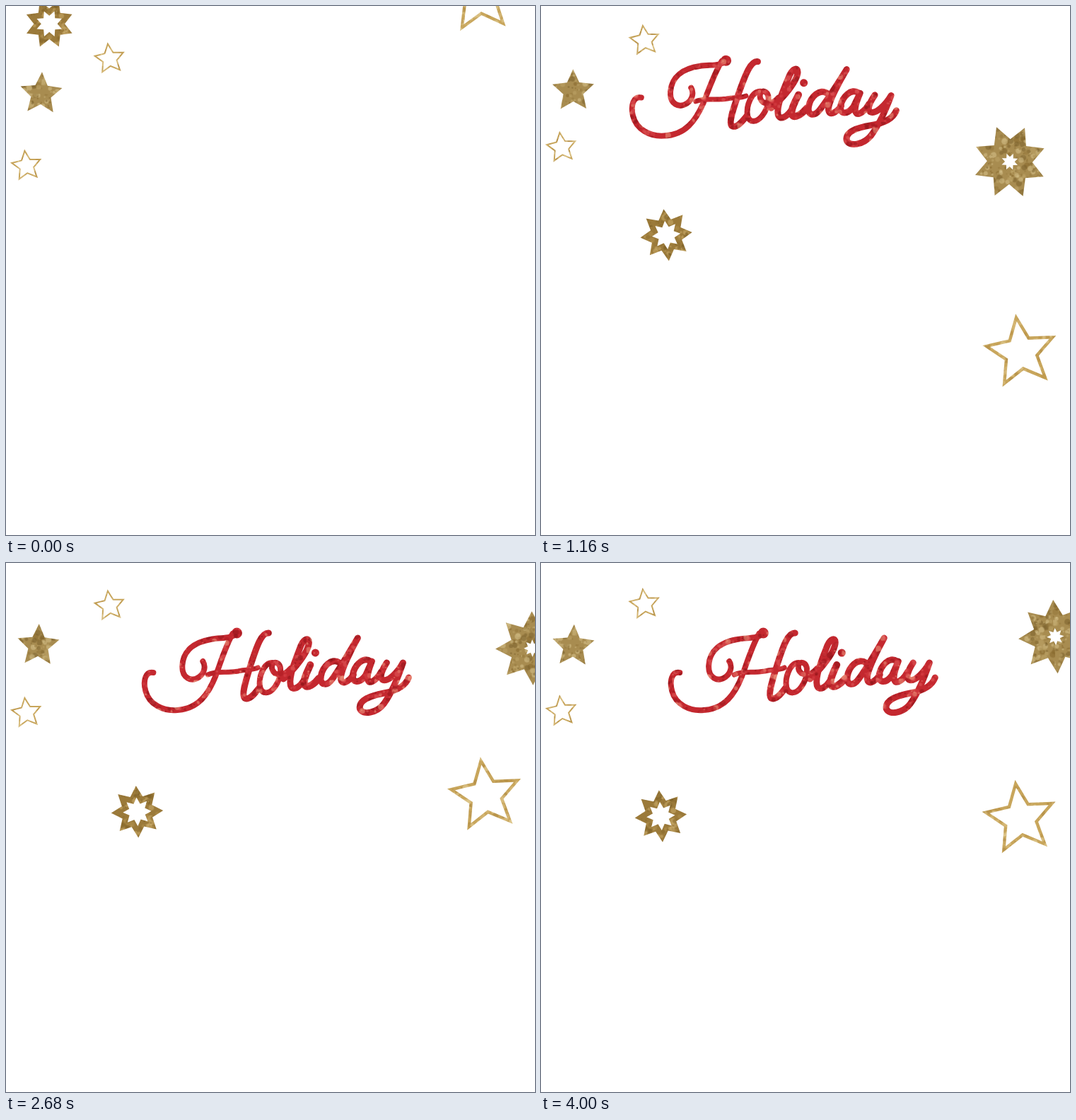
These frames come from a looping animation (748 by 748 pixels, 4040 ms). An HTML page:

```html
<!DOCTYPE html>
<html lang="en">
<head>
<meta charset="utf-8">
<title>Holiday</title>
<style>
  html, body { margin: 0; width: 100%; height: 100%; overflow: hidden; background: #fff; }
  svg { display: block; width: 100vw; height: 100vh; }
</style>
</head>
<body>
<svg id="stage" viewBox="0 0 748 748">
  <defs id="defs"></defs>
  <g id="word" role="img" aria-label="Holiday" fill="none" stroke="url(#red)" stroke-width="9"
     stroke-linecap="round" stroke-linejoin="round">
    <!-- H -->
    <path stroke-width="8" d="M198 155C187 153 183 166 187 181C192 200 212 210 232 208C262 206 276 185 286 160C294 138 300 118 310 100"/>
    <path stroke-width="8" d="M316 99C308 108 294 105 279 108C256 112 240 124 239 145C238 163 252 169 263 161C271 155 272 145 268 139"/>
    <path d="M361 99C350 98 343 122 336 143C330 163 322 185 327 191C334 195 342 184 348 176"/>
    <path stroke-width="7" d="M275 158C288 152 300 156 318 153C330 150 338 152 346 148"/>
    <path stroke-width="15" d="M316 99h.1"/>
    <!-- o l i -->
    <path stroke-width="8" d="M366 141C354 141 346 162 349 176C352 186 362 186 370 175C379 162 381 144 372 141C365 139 363 150 370 156C378 160 386 156 392 149"/>
    <path d="M382 164C398 150 418 125 418 112C418 105 411 107 407 116C400 134 389 160 392 173C395 182 405 176 412 164"/>
    <path stroke-width="10" d="M420 144C415 155 409 166 412 173C416 178 426 171 432 163"/>
    <path stroke-width="11" d="M427 127h.1"/>
    <!-- d a y -->
    <path d="M461 141C450 133 437 147 435 160C433 173 443 175 451 164C462 149 474 128 487 106C478 122 463 152 463 163C464 174 474 168 481 158"/>
    <path d="M505 139C494 131 482 146 480 158C479 171 490 170 498 159L507 139C502 152 498 163 503 168C508 170 516 162 520 154"/>
    <path d="M528 141C522 150 517 161 522 165C530 169 544 154 551 141C546 156 536 182 524 199C514 212 494 216 490 206C488 194 504 188 524 184C545 180 555 173 559 162"/>
  </g>
</svg>
<script>
const LOOP = 4040, STEP = 40, TILE = 96;
const stage = document.getElementById("stage");
const defs = document.getElementById("defs");
const word = document.getElementById("word");

function add(parent, tag, attrs) {
  const el = document.createElementNS("http://www.w3.org/2000/svg", tag);
  for (const name in attrs) el.setAttribute(name, attrs[name]);
  return parent.appendChild(el);
}

let seed = 7;
const random = () => (seed = seed * 16807 % 2147483647) / 2147483647;

// Glittery foil: a base tone covered with small seeded flecks
function foil(id, base, flecks) {
  const pattern = add(defs, "pattern", { id, width: TILE, height: TILE, patternUnits: "userSpaceOnUse" });
  add(pattern, "rect", { width: TILE, height: TILE, fill: base });
  for (let i = 0; i < 320; i++) {
    add(pattern, "circle", {
      cx: random() * TILE, cy: random() * TILE, r: 1 + 3.6 * random() ** 2,
      fill: flecks[Math.floor(random() * flecks.length)], opacity: 0.55
    });
  }
  return pattern;
}
const foils = [
  foil("gold", "#a88c50", ["#846629", "#94763a", "#bda468", "#d6c28c", "#79602b"]),
  foil("bronze", "#9b7a3a", ["#785a22", "#89692b", "#b3924f", "#cbac6c"]),
  foil("line", "#c8a65c", ["#ad873f", "#dcc184", "#b99145", "#e3cf9a"]),
  foil("red", "#c4282f", ["#98141b", "#ad1c23", "#d63f45", "#e25a5a", "#8e1218", "#ee9a80"])
];

function starPath(points, outer, inner) {
  let d = "";
  for (let i = 0; i < points * 2; i++) {
    const a = Math.PI * i / points, r = i % 2 ? inner : outer;
    d += (i ? "L" : "M") + (r * Math.sin(a)).toFixed(2) + " " + (-r * Math.cos(a)).toFixed(2);
  }
  return d + "Z";
}
const ring = (points, outer, inner, holeOuter, holeInner) =>
  starPath(points, outer, inner) + starPath(points, holeOuter, holeInner);

// Damped swing around rest: crosses it at `cross` and again every `half` ms.
// `lag` is an extra starting offset that fades out quickly.
function spring(rest, { swing = 0, cross = 0, half = 1400, damping = 0.001, lag = 0 } = {}) {
  return t => rest
    + swing * Math.exp(-damping * t) * Math.sin(Math.PI * (t - cross) / half)
    + lag * Math.exp(-t / 220);
}

const smallStar = {
  d: ring(5, 23.6, 11.4, 18.8, 9.2), foil: "line",
  x: spring(146.5), y: spring(59, { swing: -40, cross: 180 }), turn: spring(-7)
};

const shapes = [
  smallStar,
  { ...smallStar, x: spring(29), y: t => smallStar.y(t) + 151.3 },
  {
    d: starPath(5, 31, 14.8), foil: "gold",
    x: spring(45.6, { lag: 4 }),
    y: spring(117.5, { swing: 22, cross: -150, half: 1500 }),
    turn: spring(2.5, { swing: 11, half: 700 })
  },
  {
    d: ring(5, 55.2, 25.6, 44.2, 20.4), foil: "line",
    x: spring(678, { swing: 8.2, cross: 1000, half: 2000 }),
    y: spring(354.5, { swing: 416, cross: 450, half: 1309, damping: 0.00096 }),
    turn: spring(-7.8, { lag: 2 })
  },
  {
    d: ring(8, 36.8, 23, 20.2, 12), foil: "bronze",
    x: spring(175.5, { swing: 150, cross: 1145, half: 1900, damping: 0.0008, lag: 28 }),
    y: spring(355, { swing: 220, cross: 255, half: 790, lag: -143 }),
    turn: spring(-4, { swing: 19, cross: 1400, half: 2500 }),
    size: spring(1, { lag: -0.05 })
  },
  {
    d: ring(8, 52.3, 32, 12.2, 6.8), foil: "gold",
    x: spring(728, { swing: 196, cross: 1920, half: 2000, damping: 0.0009, lag: -200 }),
    y: spring(117, { swing: 262, cross: 790, half: 930, damping: 0.00075, lag: -200 }),
    turn: spring(-4, { swing: 124, cross: 1800, half: 3000, damping: 0.0013 })
  }
];
for (const s of shapes) {
  s.el = add(stage, "path", { d: s.d, fill: `url(#${s.foil})`, "fill-rule": "evenodd" });
}

const wordX = spring(0, { swing: 202, cross: 1990, half: 1600, damping: 0.0011 });
const wordY = spring(0, { lag: -3900 });
const wordTurn = spring(0, { lag: 350 });

function draw(time) {
  const step = Math.floor(time % LOOP / STEP), t = step * STEP;
  for (const s of shapes) {
    const size = s.size ? s.size(t) : 1;
    s.el.setAttribute("transform", `translate(${s.x(t)} ${s.y(t)}) rotate(${s.turn(t)}) scale(${size})`);
  }
  word.setAttribute("transform", `translate(${wordX(t)} ${wordY(t)}) rotate(${wordTurn(t)} 374 155)`);
  const drift = TILE * t / LOOP;
  foils.forEach((f, i) => f.setAttribute("patternTransform", `translate(${drift * (i + 2)} ${drift * 3})`));
}

const start = performance.now();
function tick() {
  draw(performance.now() - start);
  requestAnimationFrame(tick);
}
tick();
</script>
</body>
</html>
```
